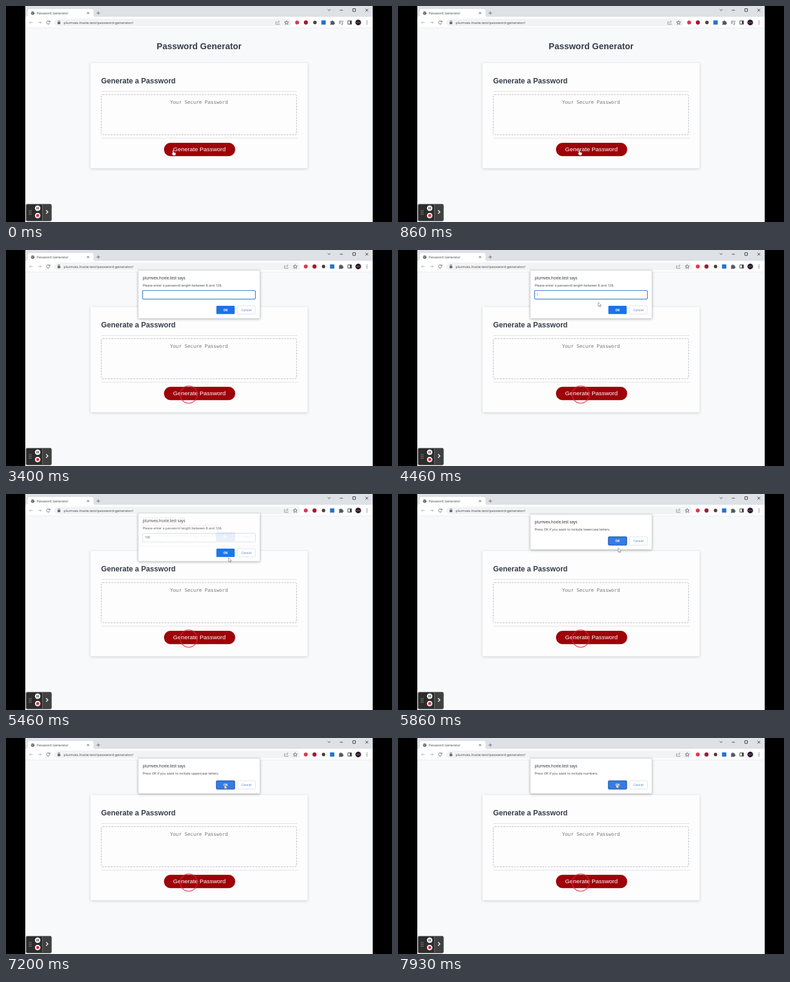
An HTML page for the animation above (8 s loop, 640 by 360 pixels).

```html
<!DOCTYPE html>
<html lang="en">
<head>
<meta charset="utf-8">
<title>Password Generator</title>
<style>
  html, body { margin: 0; width: 100%; height: 100%; overflow: hidden; background: #000; }
  svg { display: block; width: 100%; height: 100%; }
  text { font-family: "Open Sans", "Noto Sans", sans-serif; fill: #3c4043; }
  .page text { font-family: "Liberation Sans", Arial, sans-serif; fill: #363d4a; }
  .page .mono { font-family: "DejaVu Sans Mono", "Noto Sans Mono", monospace; fill: #777; }
  .bold { font-weight: 700; }
  .mid { text-anchor: middle; }
  .line { fill: none; stroke: #5f6368; stroke-width: .9; }
  .soft { stroke: #93979c; }
  .pale { stroke: #bbbec2; }
  .dark { stroke: #333; }
  .dialog { filter: drop-shadow(0 1px 2px rgba(0, 0, 0, .28)); }
</style>
</head>
<body>
<svg viewBox="0 0 640 360" xmlns="http://www.w3.org/2000/svg">
  <rect width="640" height="360"/>
  <rect x="32" width="576" height="360" fill="#f7f9fb"/>

  <!-- browser frame -->
  <rect x="32" width="576" height="18" fill="#dee1e6"/>
  <path d="M33 18q3 0 3-3V8q0-3 3-3h103q3 0 3 3v7q0 3 3 3z" fill="#fff"/>
  <rect x="32" y="18" width="576" height="18.5" fill="#fff"/>
  <path d="M32 36.7h576" stroke="#dfe1e5" stroke-width=".6"/>
  <circle cx="44.3" cy="11.8" r="2.9" fill="#5f6368"/>
  <path d="M42.3 11l1.6 .6 .3 1.6M44.7 9.6l1.6 1.4" stroke="#fff" stroke-width=".7" fill="none"/>
  <text x="51" y="13.7" font-size="5.5">Password Generator</text>
  <path class="line" d="M134.3 10l3.6 3.6m0-3.6l-3.6 3.6M150.2 11.8h5.6m-2.8-2.8v5.6"/>
  <path class="line dark" d="M533.5 5.5l2.2 2.2 2.2-2.2M553.5 7h5M575 4.5h4.5v4.5h-4.5zM596 4.7l4.5 4.5m0-4.5l-4.5 4.5"/>
  <path class="line pale" d="M44.5 27.5H39m2.6-2.6L39 27.5l2.6 2.6M53 27.5h5.5m-2.6-2.6l2.6 2.6-2.6 2.6"/>
  <path class="line" d="M72.3 25.8a2.7 2.7 0 1 0 .4 2.6M73 24.2v2.3h-2.3"/>
  <rect id="omni" x="80" y="21" height="13" rx="6.5" fill="#f1f3f4"/>
  <rect x="85.6" y="26.7" width="4.4" height="3.6" rx=".5" fill="#5f6368"/>
  <path class="line" d="M86.5 27v-1.3a1.3 1.3 0 0 1 2.6 0V27"/>
  <text x="95.8" y="29.5" font-size="6.1">plumvex.hoxle.test/password-generator/</text>
  <g id="icons">
    <path class="line soft" d="M463 26h-1.5v4.5h6V29M463.5 29q.5-3 4-3m-1.5-1.7l1.7 1.7-1.7 1.7"/>
    <path class="line" d="M479.5 24.3l1 2.2 2.4 .2-1.8 1.6 .6 2.4-2.2-1.3-2.2 1.3 .6-2.4-1.8-1.6 2.4-.2z"/>
    <circle cx="497" cy="27.5" r="3.2" fill="#df3848"/>
    <circle cx="511.5" cy="27.5" r="3.4" fill="#a81730"/>
    <circle cx="526.5" cy="27.5" r="2.9" fill="#514239"/>
    <rect x="537.2" y="24" width="7.2" height="7" fill="#2376d2"/>
    <path d="M552 25.5h2a1.3 1.3 0 0 1 2.6 0h1.9v2a1.2 1.2 0 0 1 0 2.4v1.3H552v-1.7a1.2 1.2 0 0 0 0-2.3z" fill="#55595e"/>
  </g>
  <path id="media" class="line" d="M552 25.3h5m-5 2h3.5m-3.5 2h2.5m3.5 .6v-4.6h1.3M558 30a.9 .9 0 1 1-1.5-.6"/>
  <path class="line dark" d="M566.8 24.8h6v5.4h-6z"/>
  <path d="M570.3 24.8h2.5v5.4h-2.5z" fill="#333"/>
  <circle cx="584" cy="27.5" r="4.7" fill="#2a1c30"/>
  <path d="M580.7 27.5h6.6" stroke="#78425f" stroke-width="1.6"/>
  <g fill="#5f6368"><circle cx="598.5" cy="25" r=".8"/><circle cx="598.5" cy="27.5" r=".8"/><circle cx="598.5" cy="30" r=".8"/></g>

  <!-- page -->
  <g class="page">
    <text class="bold mid" x="320.2" y="72" font-size="14.4">Password Generator</text>
    <rect x="140" y="95" width="360" height="175.5" rx="2" fill="#fdfdfe" style="filter:drop-shadow(0 1px 2px rgba(0,0,0,.18))"/>
    <text class="bold" x="157.8" y="128.7" font-size="12.15">Generate a Password</text>
    <path d="M158 142.5h325M158 220.2h325" stroke="#dfe0e3" stroke-width=".9"/>
    <rect x="158" y="147.7" width="323.7" height="67" rx="2.5" fill="none" stroke="#bcbdc0" stroke-dasharray="3 1.7"/>
    <text class="mono mid" x="320" y="163.2" font-size="7.97">Your Secure Password</text>
    <rect x="262" y="228" width="118" height="22.3" rx="11.15" fill="#9d0309"/>
    <text class="mid" x="320.7" y="242.2" font-size="9.9" style="fill:#fff">Generate Password</text>
  </g>
  <circle id="ring" cx="303" cy="241" r="14.3" fill="none" stroke="#d9263f" stroke-width="1.8" opacity=".65"/>

  <!-- recorder -->
  <rect x="33.3" y="330.3" width="42" height="28" rx="2" fill="#2d2d2e"/>
  <path d="M60.5 330.3h12.8q2 0 2 2v24q0 2-2 2H60.5z" fill="#404041"/>
  <path d="M60.5 330.3v28" stroke="#77787a" stroke-width=".8"/>
  <rect x="33.3" y="330.3" width="42" height="28" rx="2" fill="none" stroke="#606163" stroke-width=".8"/>
  <g id="grip" fill="#aaa"></g>
  <circle cx="52.5" cy="337" r="4.5" fill="#fff"/>
  <path d="M51.3 335v4m2.4-4v4" stroke="#333" stroke-width="1.2"/>
  <circle cx="52.5" cy="349.2" r="4.5" fill="#fff"/>
  <rect x="50.3" y="347" width="4.4" height="4.4" rx=".5" fill="#d8283c"/>
  <path d="M66.5 340.3l3 3-3 3" fill="none" stroke="#fff" stroke-width="1.3"/>

  <g id="dialogs"></g>
  <g id="cursor" fill="#fff" stroke="#666" stroke-width=".6" stroke-linejoin="round">
    <path id="arrow" d="M0 0v7l1.7-1.5 1.1 2.5 1.1-.5-1.1-2.4H5z"/>
    <path id="hand" d="M-.8 .8q.9-1.5 1.7 0v3l2.8 .7q1 .3 .8 1.4L3.9 9H0l-2.5-3.3q.5-1.1 1.7 0z"/>
  </g>
</svg>
<script>
const LOOP = 8000, OPEN = 250, CLOSE = 130, BLINK = 530, FOCUS = 1810;
const $ = id => document.getElementById(id);
const clamp = v => Math.max(0, Math.min(1, v));
const smooth = v => { v = clamp(v); return v * v * (3 - 2 * v); };
const show = (el, on) => el.setAttribute('visibility', on ? 'inherit' : 'hidden');

const dialogs = [
  { open: 1540, close: 5420, text: 'Please enter a password length between 8 and 128.', prompt: true },
  { open: 5430, close: 6195, text: 'Press OK if you want to include lowercase letters.' },
  { open: 6205, close: 7390, text: 'Press OK if you want to include uppercase letters.' },
  { open: 7400, close: 9000, text: 'Press OK if you want to include numbers.' }
];
const typed = [[4400, '1'], [4660, '10'], [4830, '100']];

// time, x, y of the pointer tip
const path = [
  [0, 277, 240], [60, 277, 240], [330, 288, 238], [660, 288, 238], [930, 303, 240],
  [1480, 303, 240], [1860, 350, 107], [2060, 345, 98], [2130, 345, 98], [2600, 320, 78],
  [4130, 320, 82], [4260, 332, 87], [5000, 332, 87], [5340, 369, 106], [5460, 369, 106],
  [5800, 365, 90], [5860, 365, 90], [6150, 362, 82], [6330, 362, 82], [6460, 363, 80],
  [6660, 363, 80], [6800, 362, 78], [7130, 362, 78], [7400, 363, 79], [7900, 362, 77]
];

function dialogMarkup(d) {
  const top = d.prompt ? 93 : 71.4;
  const input = d.prompt ? `
    <rect class="input" x="226.5" y="67.5" width="187" height="14.3" rx="1.2" fill="#fff"/>
    <text class="value" x="230" y="76.3" font-size="5.1"></text>
    <path class="caret" d="M230.5 71v7" stroke="#555" stroke-width=".6"/>` : '';
  const ok = d.prompt ? 'fill="#1a73e8"' : 'fill="#357be2" stroke="#1f57a8" stroke-width="1.1"';
  return `<g class="dialog">
    <rect x="219.2" y="34" width="201.8" height="${d.prompt ? 80 : 58.6}" rx="1.5" fill="#fff" stroke="#cfd1d5" stroke-width=".6"/>
    <text x="226.7" y="48.8" font-size="6.4" style="fill:#202124">plumvex.hoxle.test says</text>
    <text x="226.5" y="61.3" font-size="5.5">${d.text}</text>${input}
    <rect x="348.8" y="${top}" width="30.4" height="13.8" rx="1.5" ${ok}/>
    <text class="mid bold" x="364" y="${top + 8.8}" font-size="5.3" style="fill:#fff">OK</text>
    <rect x="383.7" y="${top}" width="29.6" height="13.8" rx="1.5" fill="#fff" stroke="#d6d9de" stroke-width=".7"/>
    <text class="mid" x="398.5" y="${top + 8.8}" font-size="5.4" style="fill:#3b7bd9">Cancel</text>
  </g>`;
}

$('dialogs').innerHTML = dialogs.map(dialogMarkup).join('');
dialogs.forEach((d, i) => d.el = $('dialogs').children[i]);
const part = name => document.querySelector('.' + name);
const input = part('input'), value = part('value'), caret = part('caret');

$('grip').innerHTML = [0, 1, 2, 3, 4, 5].map(i =>
  `<circle cx="${38.7 + i % 2 * 2.6}" cy="${341 + (i >> 1) * 3}" r=".75"/>`).join('');

function pointAt(t) {
  const i = path.findIndex(p => p[0] > t);
  if (i < 0) return path[path.length - 1].slice(1);
  const [t0, x0, y0] = path[i - 1], [t1, x1, y1] = path[i];
  const k = smooth((t - t0) / (t1 - t0));
  return [x0 + (x1 - x0) * k, y0 + (y1 - y0) * k];
}

function drawDialog(d, t) {
  const p = clamp((t - d.open) / OPEN), q = clamp((t - d.close) / CLOSE);
  const y = -8 * (1 - p) - 6 * q;
  show(d.el, p > 0 && q < 1);
  d.el.setAttribute('transform', `translate(0 ${y.toFixed(2)})`);
  d.el.setAttribute('opacity', smooth(p / .65) * (1 - q ** 3));
}

function drawInput(t) {
  const keys = typed.filter(k => k[0] <= t);
  const text = keys.length ? keys[keys.length - 1][1] : '';
  const active = t < dialogs[0].close;
  const blinkOn = Math.floor((t - FOCUS) / BLINK) % 2 === 0;
  value.textContent = text;
  input.setAttribute('stroke', active ? '#3a80cc' : '#d0d3d8');
  input.setAttribute('stroke-width', active ? 1.2 : .7);
  caret.setAttribute('transform', `translate(${text.length * 2.9} 0)`);
  caret.setAttribute('opacity', active && t >= FOCUS && blinkOn ? 1 : 0);
}

function draw(t) {
  const shifted = t >= 2400;
  $('omni').setAttribute('width', shifted ? 408 : 394);
  $('icons').setAttribute('transform', `translate(${shifted ? 0 : -14.3} 0)`);
  show($('media'), !shifted);
  $('media').setAttribute('opacity', t < 1540 ? 1 : .3);
  show($('ring'), t >= 1300);
  dialogs.forEach(d => drawDialog(d, t));
  drawInput(t);
  const [x, y] = pointAt(t);
  $('cursor').setAttribute('transform', `translate(${x.toFixed(2)} ${y.toFixed(2)})`);
  show($('cursor'), t < 2400 || t >= 4130);
  show($('hand'), t < 1540);
  show($('arrow'), t >= 1540);
}

const began = performance.now();
function tick() {
  draw((performance.now() - began) % LOOP);
  requestAnimationFrame(tick);
}
tick();
</script>
</body>
</html>
```
